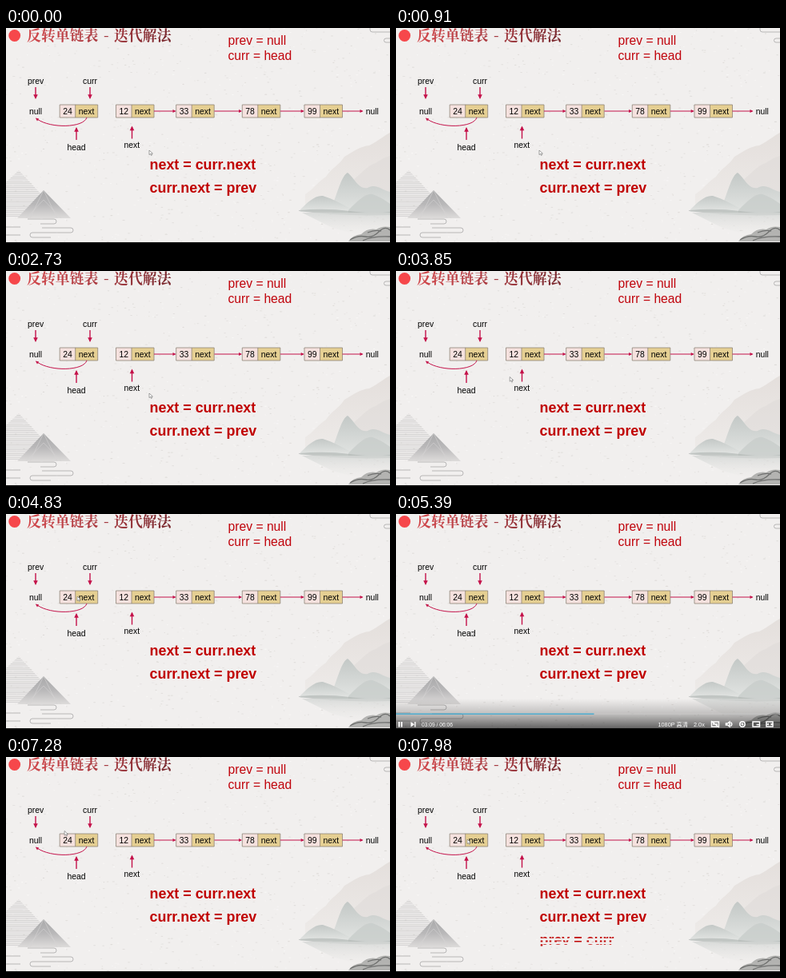
Animation of 480 by 269 pixels, one loop 8 s. Source, as an HTML page:

```html
<!DOCTYPE html>
<html lang="zh">
<head>
<meta charset="utf-8">
<style>
  html, body { margin: 0; width: 100%; height: 100%; overflow: hidden; background: #f1efee; }
  svg { display: block; width: 100vw; height: 100vh; }
  text { font-family: "Liberation Sans", Arial, sans-serif; }
  .title { font: 700 17.9px "Noto Serif CJK SC", "Noto Sans CJK SC", serif; fill: url(#ink); }
  .init { font-size: 15.7px; fill: #c0040c; }
  .step { font-size: 17.9px; font-weight: 700; fill: #c00000; }
  .label { font-size: 10.4px; fill: #000; }
  .arrow { fill: none; stroke: #c4124a; stroke-width: 1; }
  .head { fill: #c4124a; }
  .player text { font-size: 7.3px; fill: #fff; font-family: "Liberation Sans", "Noto Sans CJK SC", sans-serif; }
  .icon { fill: none; stroke: #fff; stroke-width: 1.5; }
  .cloud { fill: none; stroke: #b0afaf; stroke-width: .9; }
</style>
</head>
<body>
<svg viewBox="0 0 480 269" preserveAspectRatio="none">
  <defs>
    <linearGradient id="ink" gradientUnits="userSpaceOnUse" x1="26" x2="208" y1="0" y2="0">
      <stop stop-color="#d2484c"/><stop offset=".5" stop-color="#a93a40"/><stop offset="1" stop-color="#76262c"/>
    </linearGradient>
    <linearGradient id="far" x2="0" y2="1">
      <stop stop-color="#e4dfdc"/><stop offset="1" stop-color="#eeebe9"/>
    </linearGradient>
    <linearGradient id="near" x2="0" y2="1">
      <stop stop-color="#c3c8c6"/><stop offset="1" stop-color="#e3e5e3"/>
    </linearGradient>
    <linearGradient id="water" x2="0" y2="1">
      <stop stop-color="#d3d6d4" stop-opacity=".8"/><stop offset="1" stop-color="#eceae8" stop-opacity="0"/>
    </linearGradient>
    <linearGradient id="peak" x2="0" y2="1">
      <stop stop-color="#a9a9aa"/><stop offset=".5" stop-color="#b9b8b9"/><stop offset="1" stop-color="#dddbda"/>
    </linearGradient>
    <linearGradient id="shade" x2="0" y2="1">
      <stop stop-opacity="0"/><stop offset=".5" stop-opacity=".2"/><stop offset="1" stop-opacity=".6"/>
    </linearGradient>
    <pattern id="lines" width="4" height="2.4" patternUnits="userSpaceOnUse">
      <path d="M0 .6H4" stroke="#bebdbd" stroke-width=".9"/>
    </pattern>
    <clipPath id="blinds"><path id="slats"/></clipPath>
  </defs>

  <rect width="480" height="269" fill="#f1efee"/>
  <g id="paper"></g>

  <g>
    <path d="M374 208C384 202 390 192 400 186C406 176 416 172 423 161C435 154 443 148 454 147C466 141 472 135 480 131V228H374Z" fill="url(#far)"/>
    <path d="M420 200C438 190 450 172 462 169Q472 162 480 160V215H420Z" fill="#dedad7" opacity=".5"/>
    <path d="M408 222C415 204 420 184 427 181C436 188 440 202 452 200C463 194 470 203 480 205V232H408Z" fill="url(#near)"/>
    <path d="M368 227C376 219 386 209 396 210C410 214 420 221 440 230H368Z" fill="url(#near)"/>
    <path d="M428 228C440 215 451 206 458 208Q470 212 480 220V232H428Z" fill="#c9cecb" opacity=".8"/>
    <path d="M366 228Q400 225 430 229T480 230V234Q420 236 366 229Z" fill="#b4bab7" opacity=".7"/>
    <path d="M370 231H480V262Q420 258 398 245Z" fill="url(#water)"/>
    <path d="M428 267Q433 259 444 258Q452 250 463 252Q470 247 480 249V267Z" fill="#b3b3b1"/>
    <path d="M430 265Q440 259 449 261T466 255T480 253M446 266Q458 260 480 261M452 256Q461 252 469 254" fill="none" stroke="#6f706f" stroke-width="1.3"/>
    <path class="cloud" d="M455 0V2a3 3 0 0 0 3 3H480M480 13H475a2.5 2.5 0 0 0 0 5H480"/>
  </g>

  <g>
    <path d="M16 178L70 236H-20V212Z" fill="url(#lines)" opacity=".75"/>
    <path d="M47 203L81 238H14Z" fill="url(#peak)"/>
    <path d="M47 203L30 238M47 203L64 238M47 215L69 238M47 215L25 238" fill="none" stroke="#d6d4d3" stroke-width=".6"/>
    <path class="cloud" d="M27 239H60a3 3 0 0 1 0 6H43M0 249H18M45 250H81a3 3 0 0 1 0 6H33a3 3 0 0 0 0 6H56M0 259H18"/>
  </g>

  <circle cx="10.7" cy="9.5" r="7.4" fill="#f6474b"/>
  <text class="title" x="26" y="16">反转单链表</text>
  <text class="title" x="122" y="15.5">-</text>
  <text class="title" x="135" y="16">迭代解法</text>
  <text class="init" x="277.5" y="21">prev = null</text>
  <text class="init" x="277.5" y="40">curr = head</text>

  <g id="list"></g>
  <path class="arrow" d="M101 112C97 125 56 126 39 114"/>
  <path class="head" d="M36.8 112.5L41.2 113.6L39 116.4Z"/>

  <text class="step" x="179.5" y="176.5">next = curr.next</text>
  <text class="step" x="179.5" y="206">curr.next = prev</text>
  <g clip-path="url(#blinds)"><text class="step" x="179.5" y="235">prev = curr</text></g>

  <rect y="268" width="480" height="1" fill="#111"/>

  <g id="player" class="player">
    <rect y="231" width="480" height="38" fill="url(#shade)"/>
    <rect y="249.5" width="480" height="1.3" fill="#ccc" opacity=".45"/>
    <rect y="249.5" width="247.5" height="1.3" fill="#3aa9d2"/>
    <path d="M3 260h1.8v6.5H3zM6.2 260h1.8v6.5H6.2zM18.5 260l4.5 3.2l-4.5 3.2zM23.2 260h1.4v6.4h-1.4z" fill="#fff"/>
    <text x="32" y="265.5" style="font-size:6.7px">03:09 / 06:06</text>
    <text x="327.5" y="265.5">1080P 高清</text>
    <text x="372" y="265.5">2.0x</text>
    <g class="icon">
      <path d="M394.5 260h9v6h-9zM396 263h6M394 259l10 8"/>
      <path d="M412.5 262h2l2.5-2v6l-2.5-2h-2zM418.5 260.5q2.5 2.5 0 5"/>
      <circle cx="433" cy="263" r="3.2"/><circle cx="433" cy="263" r=".8"/>
      <path d="M446 260h8.5v6H446zM450.5 263.5h3.5"/>
      <path d="M463 260h8v6h-8zM466 262l-1.5 1l1.5 1M468.5 262l1.5 1l-1.5 1"/>
    </g>
  </g>

  <path id="cursor" d="M0 0V5.6L1.5 4.4L2.5 6.5L3.5 6L2.6 4H4.4Z" fill="#fff" stroke="#666" stroke-width=".6"/>
</svg>

<script>
const LOOP = 8000;
const byId = id => document.getElementById(id);
const clamp = v => Math.min(1, Math.max(0, v));

// Paper grain
let seed = 7;
const random = () => (seed = seed * 16807 % 2147483647) / 2147483647;
let grain = '';
for (let i = 0; i < 1000; i++) {
  const x = random() * 480, y = random() * 268, light = random() < .4;
  grain += `<ellipse cx="${x.toFixed(1)}" cy="${y.toFixed(1)}" rx="${(.5 + random() * 1.3).toFixed(1)}" ry=".6"
    fill="${light ? '#fbfaf9' : '#d9d6d3'}" opacity="${(.3 + random() * .5).toFixed(2)}"/>`;
}
byId('paper').innerHTML = grain;

const label = (x, y, text) => `<text class="label" x="${x}" y="${y}">${text}</text>`;

function arrow(x1, y1, x2, y2, size = 1) {
  const angle = Math.atan2(y2 - y1, x2 - x1) * 180 / Math.PI;
  return `<path class="arrow" d="M${x1} ${y1}L${x2} ${y2}" style="stroke-width:${size}"/>
    <path class="head" d="M1 0L-3 -2V2Z" transform="translate(${x2} ${y2}) rotate(${angle}) scale(${size})"/>`;
}

const pointer = (x, from, to) => arrow(x, from, x, to, 1.4);

function node(x, value) {
  return `<rect x="${x}" y="96" width="20" height="16" fill="#f5e1de"/>
    <rect x="${x + 19.5}" y="96" width="28" height="16" fill="#e5cf92"/>
    <path d="M${x} 96h47.5v16h-47.5zM${x + 19.5} 96v16" fill="none" stroke="#8f8578" stroke-width=".8"/>
    ${label(x + 4, 108, value)}${label(x + 23.5, 108, 'next')}`;
}

byId('list').innerHTML = [
  node(67.2, 24), node(137.5, 12), node(212.7, 33), node(295.3, 78), node(373, 99),
  arrow(185, 104, 211.5, 104), arrow(260.5, 104, 294, 104),
  arrow(343, 104, 371.7, 104), arrow(420.5, 104, 445.5, 104),
  label(27, 70, 'prev'), pointer(37, 74, 87.5),
  label(96, 70, 'curr'), pointer(105, 74, 87.5),
  label(76.5, 152.5, 'head'), pointer(88, 140, 125.5),
  label(147.5, 150, 'next'), pointer(157.5, 138.5, 124),
  label(29, 108.3, 'null'), label(449.7, 107.5, 'null')
].join('');

// Cursor stops: time, x, y
const stops = [
  [0, 179, 153], [3500, 179, 153], [4300, 89, 103], [4900, 89, 103],
  [5320, 94, 147], [5850, 94, 147], [6400, 43.5, 73], [6950, 43.5, 73],
  [7500, 89, 103], [LOOP, 89, 103]
];

function cursorAt(t) {
  const i = stops.findIndex(s => s[0] > t);
  const [t0, x0, y0] = stops[i - 1], [t1, x1, y1] = stops[i];
  const p = (t - t0) / (t1 - t0), e = p * p * (3 - 2 * p);
  return [x0 + (x1 - x0) * e, y0 + (y1 - y0) * e];
}

function slats(progress) {
  const pitch = 4.8;
  let d = '';
  for (let i = 0; i < 6; i++) d += `M170 ${215 + i * pitch}h120v${pitch * progress}h-120z`;
  return d;
}

function draw(now) {
  const t = now % LOOP;
  byId('cursor').setAttribute('transform', `translate(${cursorAt(t)})`);
  byId('player').setAttribute('opacity', clamp((t - 5180) / 100) * clamp((5930 - t) / 100));
  byId('slats').setAttribute('d', slats(clamp((t - 7750) / 500)));
  requestAnimationFrame(draw);
}
requestAnimationFrame(draw);
</script>
</body>
</html>
```
